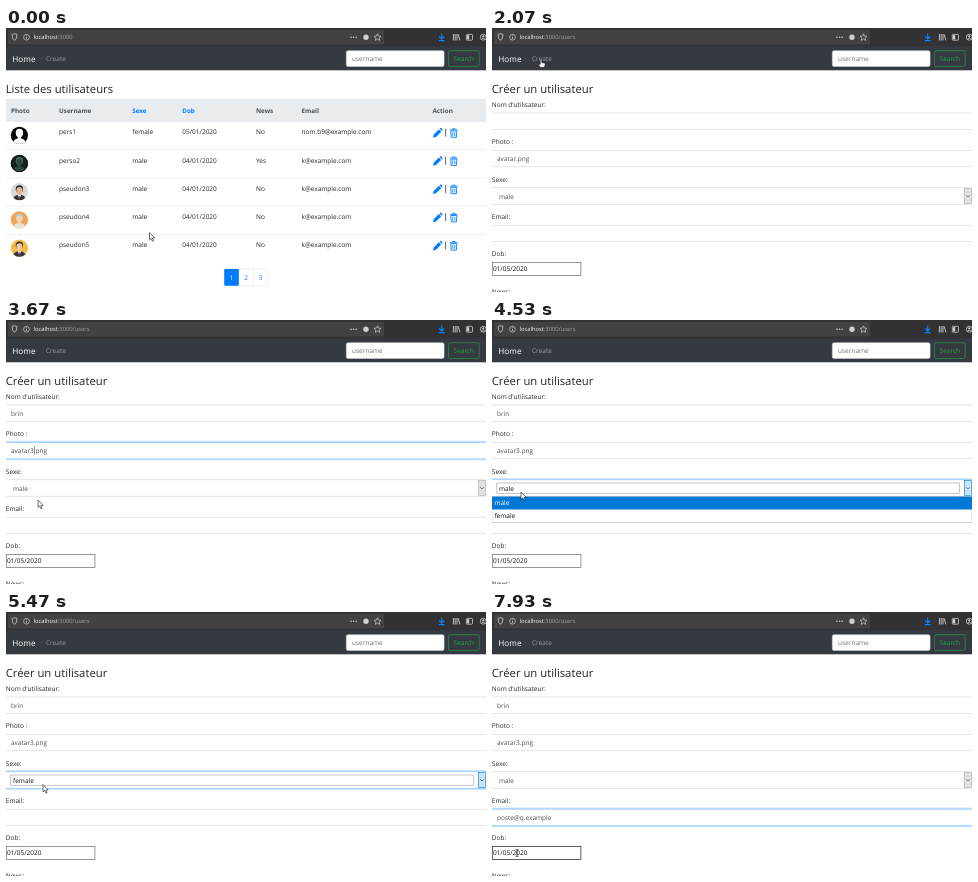
Recreate the animation shown at these times as an HTML page. Size 480 by 264 pixels, loop 8 s.

```html
<!DOCTYPE html>
<html lang="fr">
<head>
<meta charset="utf-8">
<title>Liste des utilisateurs</title>
<style>
html, body { margin: 0; width: 100%; height: 100%; overflow: hidden; background: #fff; }
svg { display: block; width: 480px; height: 264px; }
text { font-family: "Open Sans", "Noto Sans", sans-serif; text-rendering: geometricPrecision; white-space: pre; }
</style>
</head>
<body>
<svg id="stage" viewBox="0 0 480 264"></svg>
<script>
const LOOP = 8000, STEP = 200 / 3;
const INK = '#212529', GREY = '#495057', BLUE = '#007bff', LINE = '#dee2e6';
const stage = document.getElementById('stage');
const pen = document.createElement('canvas').getContext('2d');
pen.font = '65px "Open Sans", "Noto Sans", sans-serif';
const widthOf = s => pen.measureText(s).width / 10;

// drawing helpers
const text = (x, y, s, fill = INK, size = 6.5, more = '') =>
  `<text x="${x}" y="${y}" fill="${fill}" font-size="${size}" ${more}>${s}</text>`;
const rect = (x, y, w, h, fill, more = '') =>
  `<rect x="${x}" y="${y}" width="${w}" height="${h}" fill="${fill}" ${more}/>`;
const path = (d, stroke, w = .8, fill = 'none') =>
  `<path d="${d}" stroke="${stroke}" stroke-width="${w}" fill="${fill}"/>`;
const circle = (x, y, r, fill, more = '') =>
  `<circle cx="${x}" cy="${y}" r="${r}" fill="${fill}" ${more}/>`;
const at = (x, y, s) => `<g transform="translate(${x} ${y})">${s}</g>`;
const mid = 'text-anchor="middle"';

// last row of a [time, value...] table that has begun
const pick = (table, t) => table.filter(r => r[0] <= t).pop();

function toolbar(url) {
  const c = '#d0d0d3';
  return rect(0, 0, 480, 19, '#323234') + rect(2, 2, 376, 14.5, '#424245', 'rx="1"') +
    path('M8.5 5.7 L11 6.5 Q11 10.8 8.5 12.4 Q6 10.8 6 6.5Z', c) +
    circle(20.5, 9.2, 2.9, 'none', `stroke="${c}" stroke-width=".7"`) +
    path('M20.5 8.7V10.9M20.5 7.3V8', c) +
    text(27.5, 11.4, `localhost<tspan fill="#a2a2a6">:3000${url}</tspan>`, '#f9f9fa', 5.8) +
    [345, 347.6, 350.2].map(x => circle(x, 9.2, .8, c)).join('') +
    circle(360, 9.2, 2.7, c) +
    path('M371.5 5.8L372.5 8.1L375 8.3L373.1 10L373.7 12.4L371.5 11.1L369.3 12.4L369.9 10L368 8.3L370.5 8.1Z', c, .7) +
    path('M435.7 5.5V10.8M433.2 8.5L435.7 11L438.2 8.5M432.8 12.6H438.6', '#0a84ff', 1.1) +
    path('M447.4 6V12.5M449.2 6V12.5M451 6V12.5M452 6.2L454 12.4', c, .9) +
    rect(460.3, 6.4, 6.2, 5.8, 'none', `rx=".8" stroke="${c}" stroke-width=".8"`) +
    rect(461, 7.2, 2.2, 4.2, c) +
    circle(477.3, 9.2, 3, 'none', `stroke="${c}" stroke-width=".8"`) +
    circle(477.3, 8.4, 1.1, c) + path('M475.4 11.3Q477.3 9 479.2 11.3', c);
}

function navbar(hover) {
  return rect(0, 18.5, 480, 23.8, '#343a40') +
    text(6.3, 34, 'Home', '#fff', 8.2, 'font-weight="500"') +
    text(40, 33.4, 'Create', hover ? '#ccced0' : '#999c9f') +
    rect(340.3, 22.7, 97.8, 15.8, '#fff', 'rx="1.7" stroke="#ced4da" stroke-width=".5"') +
    text(346, 33, 'username', '#6c757d') +
    rect(442.4, 22.7, 30.8, 15.8, 'none', 'rx="1.7" stroke="#28a745" stroke-width=".6"') +
    text(457.8, 33, 'Search', '#28a745', 6.5, mid);
}

// flat portraits: [background, skin, hair, clothes]
const LOOKS = {
  plain: ['#000', '#fff', '#fff', '#fff'],
  night: ['#15201f', '#2b4a42', '#4d7767', '#2b4a42'],
  suit: ['#d9dadb', '#e5b48d', '#25282e', '#2f3540'],
  cap: ['#f3a25c', '#f6d3b2', '#a9c9c5', '#e9e4d8'],
  sun: ['#f6bd42', '#f2c79c', '#3d2f2b', '#343845'],
  boy: ['none', '#f3c39b', '#6d4229', '#ee8a35']
};

function avatar(x, y, look) {
  const [bg, skin, hair, wear] = LOOKS[look];
  return at(x, y, circle(0, 0, 8.6, bg) +
    `<g clip-path="url(#disc)"><ellipse cx="0" cy="8" rx="6.3" ry="5.2" fill="${wear}"/>` +
    rect(-1.4, 1, 2.8, 3, skin) +
    `<ellipse cx="0" cy="-2.6" rx="3.7" ry="3.9" fill="${hair}"/>` +
    `<ellipse cx="0" cy="-1.2" rx="3.1" ry="3.6" fill="${skin}"/>` +
    (look == 'suit' || look == 'sun' ? path('M-1.7 3.4L0 6.8L1.7 3.4Z', 'none', 0, '#fff') + path('M0 4V8', '#a33', .9) : '') +
    (look == 'boy' ? path('M-2.8 -1.5H2.8', '#4a3a35', 1) : '') + '</g>' +
    (look == 'night' ? circle(0, 0, 8.2, 'none', 'stroke="#0b0f0f" stroke-width=".9"') : ''));
}

const pencil = path('M0 9.4L.7 6.4L5.9 1.2L8.2 3.5L3 8.7Z M6.6 .6L7.3 -.1Q7.9 -.4 8.4 .1L9.3 1Q9.8 1.5 9.4 2.1L8.8 2.8Z', 'none', 0, BLUE);
const bin = path('M.9 2.6H6.9L6.5 9H1.3Z', BLUE, .9) + path('M0 1.5H7.8M2.6 1.3V.4H5.2V1.3M2.9 3.8V7.8M4.9 3.8V7.8', BLUE, .8);

const PAGES = {
  1: { cols: [5, 53, 126.3, 176.3, 250, 295.5, 426.5], rows: [
    ['plain', 'pers1', 'female', '05/01/2020', 'No', 'nom.b9@example.com'],
    ['night', 'perso2', 'male', '04/01/2020', 'Yes', 'k@example.com'],
    ['suit', 'pseudon3', 'male', '04/01/2020', 'No', 'k@example.com'],
    ['cap', 'pseudon4', 'male', '04/01/2020', 'No', 'k@example.com'],
    ['sun', 'pseudon5', 'male', '04/01/2020', 'No', 'k@example.com']] },
  2: { cols: [5, 53, 127, 178, 253, 299, 433.5], rows: [
    ['suit', 'pseudon6', 'male', '04/01/2020', 'No', 'k@example.com'],
    ['cap', 'pseudon7', 'male', '04/01/2020', 'No', 'k@example.com'],
    ['sun', 'pseudon8', 'male', '04/01/2020', 'No', 'k@example.com'],
    ['plain', 'pseudon9', 'male', '04/01/2020', 'No', 'k@example.com'],
    ['plain', 'perso10', 'female', '05/01/2020', 'Yes', 'k@example.com']] },
  3: { cols: [5, 57.3, 132.5, 187, 267, 316.5, 421.5], rows: [
    ['plain', 'pers_sous', 'female', '05/01/2020', 'Yes', 'w@b.example'],
    ['boy', 'brin1', 'female', '05/01/2015', 'No', 'il@example.com']] }
};
const HEADS = ['Photo', 'Username', 'Sexe', 'Dob', 'News', 'Email', 'Action'];

function pager(y, page, ring) {
  let s = rect(218.2, y, 43.8, 16.8, '#fff', `rx="1.7" stroke="${LINE}" stroke-width=".5"`);
  const x = 218.2 + 14.6 * (page - 1);
  s += path(`M232.8 ${y}v16.8M247.4 ${y}v16.8`, LINE, .5);
  if (ring) s += rect(x - .8, y - .8, 16.2, 18.4, 'none', 'rx="2" stroke="#007bff" stroke-opacity=".25" stroke-width="1.5"');
  s += rect(x, y, 14.6, 16.8, BLUE, 'rx="1"');
  for (let i = 1; i < 4; i++)
    s += text(210.9 + 14.6 * i, y + 10.7, i, i == page ? '#fff' : BLUE, 6.5, mid);
  return s;
}

function list(page, ring) {
  const { cols, rows } = PAGES[page], end = cols[6];
  let s = text(-.3, 65, 'Liste des utilisateurs', INK, 11.3) +
    rect(0, 71, 480, 22.3, '#e9ecef') + rect(0, 71, 480, .5, LINE) + rect(0, 92.6, 480, .9, LINE);
  HEADS.forEach((h, i) =>
    s += text(cols[i], 84.6, h, i == 2 || i == 3 ? BLUE : GREY, 6.3, 'font-weight="700"'));
  rows.forEach((r, n) => {
    const y = 93.3 + 28.2 * n;
    if (n) s += rect(0, y, 480, .5, LINE);
    s += avatar(13.4, y + 14, r[0]);
    for (let i = 1; i < 6; i++) s += text(cols[i], y + 13.1, r[i]);
    s += at(end + .5, y + 6.9, pencil) + rect(end + 12.9, y + 7.3, .7, 8, INK) + at(end + 17.4, y + 7, bin);
  });
  return s + pager(100 + 28.2 * rows.length, page, ring);
}

function field(y, value, focus, caret = -1) {
  let s = focus ? rect(-2, y - .8, 484, 18, 'none', 'stroke="#007bff" stroke-opacity=".25" stroke-width="1.5"') : '';
  s += rect(-.5, y, 481, 16.4, '#fff', `stroke="${focus ? '#80bdff' : '#ced4da'}" stroke-width=".6"`);
  s += text(5, y + 10.6, value, GREY);
  if (caret >= 0) s += rect(5.2 + widthOf(value.slice(0, caret)), y + 4, .5, 8.2, '#222');
  return s;
}

function select(value, focus, open, hot) {
  const y = 159.8;
  let s = field(y, '', focus);
  s += rect(472.3, y + .7, 7.3, 15, focus ? '#cce4f7' : '#e1e1e1', `stroke="${focus ? '#0078d7' : '#adadad'}" stroke-width=".6"`);
  s += path('M474.3 167.3L476 169L477.7 167.3', '#444', .7);
  if (focus) s += rect(4.8, 163, 462.4, 10.2, '#fff', 'stroke="#8a8a8a" stroke-width=".5"');
  s += text(7, y + 10.8, value, focus ? '#111' : GREY);
  if (open) {
    s += rect(0, 176.6, 480, 26.2, '#fff', 'stroke="#888" stroke-width=".4"');
    ['male', 'female'].forEach((o, i) => {
      if (i == hot) s += rect(0, 176.7 + 13 * i, 480, 12.8, '#0078d7');
      s += text(2.4, 185.4 + 13 * i, o, i == hot ? '#fff' : '#111');
    });
  }
  return s;
}

const MAIL = 'poste@q.example';
const NAME_LEN = [[0, 0], [2530, 1], [2670, 2], [2730, 3], [2870, 4]];
const MAIL_LEN = [[0, 0], [6270, 1], [6330, 2], [6400, 4], [6530, 5]];
// [time, value, focused, open, highlighted option]
const SELECT = [[0, 'male', 0, 0, 0], [3800, 'male', 1, 0, 0], [4200, 'male', 1, 1, 0],
  [4730, 'female', 1, 0, 0], [5530, 'female', 1, 1, 1], [5600, 'female', 1, 1, 0],
  [5670, 'male', 1, 0, 0], [5930, 'male', 0, 0, 0]];
const FOCUS = [[0, ''], [2400, 'name'], [3070, 'photo'], [3800, ''], [5930, 'mail']];

function form(t) {
  const focus = pick(FOCUS, t)[1];
  const named = pick(NAME_LEN, t)[1];
  const mailed = t < 6870 ? pick(MAIL_LEN, t)[1] : Math.min(15, 6 + Math.floor((t - 6870) / 80));
  const photo = t < 3400 ? 'avatar.png' : 'avatar3.png';
  const blink = t >= 6670 && t < 6870 || t >= 7700;
  let s = text(-.3, 65, 'Créer un utilisateur', INK, 11.3);
  ["Nom d'utilisateur:", 'Photo :', 'Sexe:', 'Email:', 'Dob:', 'News:'].forEach((l, i) =>
    s += text(-.2, 79 + 37.4 * i - (i > 3 ? .3 : 0), l));
  s += field(85, 'brin'.slice(0, named), focus == 'name', focus == 'name' ? named : -1);
  s += field(122.4, photo, focus == 'photo', focus == 'photo' ? (t < 3400 ? 6 : 7) : -1);
  s += field(197.2, MAIL.slice(0, mailed), focus == 'mail', focus == 'mail' && !blink ? mailed : -1);
  s += rect(.3, 234.6, 88.6, 12.8, '#fff', `stroke="${t >= 7800 ? '#171717' : '#6a6a6a'}" stroke-width=".7"`);
  s += text(.9, 243.4, '01/05/2020', '#111');
  s += select(...pick(SELECT, t).slice(1));
  if (t >= 2600 && t < 2930)
    s += rect(85.4, 100.2, 58.2, 9.4, '#fff', 'stroke="#767676" stroke-width=".6"') +
      text(88, 107, 'Please fill out this field.', '#222', 4.9);
  return s;
}

const POINTERS = {
  arrow: path('M0 0V7.4L1.7 5.9L2.9 8.7L4.1 8.2L2.9 5.5H5.2Z', '#111', .6, '#fff'),
  hand: path('M-.8 .6Q0 -.6 .8 .6V3.4L3.8 4.2Q4.4 4.6 4.2 5.6L3.4 8.6H-.6L-2.6 5.6Q-2.6 4.4 -.8 5.4Z', '#111', .6, '#fff'),
  beam: path('M-1.5 -3.6Q0 -3.6 0 -2.8Q0 -3.6 1.5 -3.6M0 -2.8V2.8M-1.5 3.6Q0 3.6 0 2.8Q0 3.6 1.5 3.6', '#111', .7)
};
const TRACK = [[0, 143.5, 204.5], [70, 143.5, 204.5], [330, 239, 249], [470, 239, 249], [600, 254, 250],
  [730, 254, 250], [1070, 226, 173.5], [1130, 225, 167], [1330, 225, 167], [1730, 157, 95],
  [1930, 49, 31], [2130, 49, 31], [2400, 86, 92], [2930, 86, 92], [3070, 35, 131], [3470, 35, 131],
  [3670, 32, 180], [3800, 29, 168], [4070, 29, 168], [4200, 29, 172], [4530, 29, 172], [4730, 37, 190],
  [4930, 37, 190], [5330, 37, 172.5], [5470, 37, 172.5], [5600, 32, 182], [5670, 32, 182],
  [5930, 23, 205], [7700, 23, 205], [7870, 25, 241], [8000, 25, 241]];
const KINDS = [[0, 'arrow'], [300, 'hand'], [800, 'arrow'], [1130, 'hand'], [1400, 'arrow'], [1930, 'hand'],
  [2130, 'arrow'], [2330, 'beam'], [3530, 'arrow'], [5870, 'beam']];

function pointer(t) {
  const i = Math.max(1, TRACK.findIndex(k => k[0] >= t));
  const [a, x, y] = TRACK[i - 1], [b, u, v] = TRACK[i];
  const p = Math.min(1, (t - a) / (b - a)), e = p * p * (3 - 2 * p);
  return at(x + (u - x) * e, y + (v - y) * e, POINTERS[pick(KINDS, t)[1]]);
}

const VIEWS = [[0, 1, ''], [400, 2, '/users/2/5'], [670, 3, '/users/3/5'], [1200, 1, '/users/1/5'], [2070, 0, '/users']];

function draw(t) {
  const [start, page, url] = pick(VIEWS, t);
  stage.innerHTML = '<clipPath id="disc"><circle r="8.6"/></clipPath>' + rect(0, 0, 480, 264, '#fff') +
    (page ? list(page, start > 0) : form(t)) +
    toolbar(url) + navbar(t >= 1930 && t < 2070) + pointer(t);
}

const born = performance.now();
let shown = -1;
function tick() {
  const step = Math.floor(((performance.now() - born) % LOOP + 3.4) / STEP) % 120;
  if (step != shown) draw((shown = step) * STEP + 3.4);
  requestAnimationFrame(tick);
}
tick();
</script>
</body>
</html>
```
